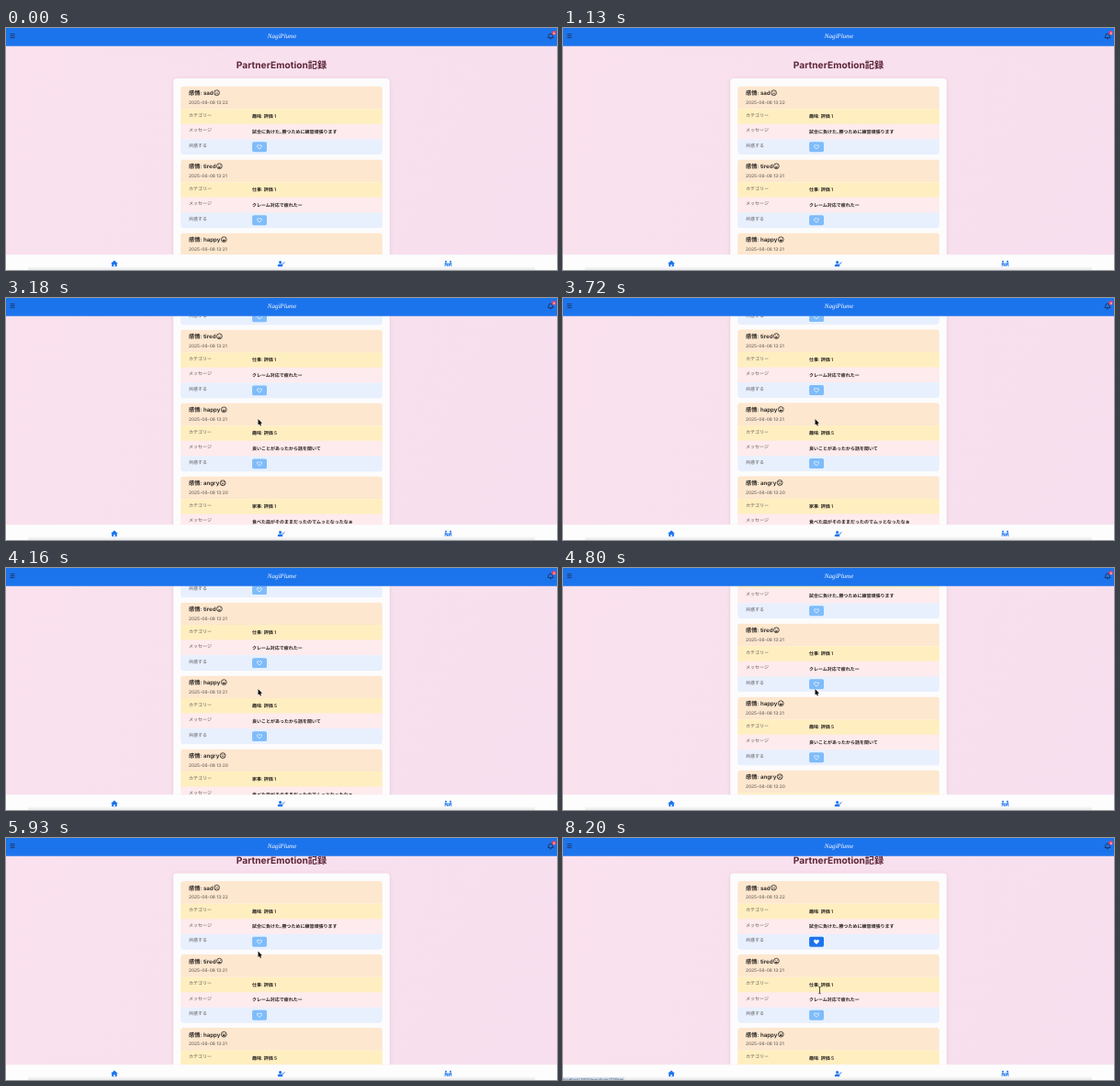
Write an HTML page with a canvas that moves like this. It is 600 px wide and 264 px high and loops after 8.22 s.

```html
<!DOCTYPE html>
<html lang="ja">
<head>
<meta charset="utf-8">
<title>PartnerEmotion記録</title>
<style>
html, body { margin: 0; width: 100%; height: 100%; overflow: hidden; background: #f9e0ee; }
canvas { display: block; width: 600px; height: 264px; }
</style>
</head>
<body>
<canvas id="stage"></canvas>
<script>
const W = 600, H = 264, LOOP = 8220;
const BLUE = '#1c74ed', INK = '#26211f', NAVY = '#22325c';
const SANS = 'Inter, "Noto Sans CJK JP", "Noto Sans CJK", sans-serif';
const CARD_TOP = 63.5, CARD_STEP = 80, ROW_TOP = 24.7, ROW = 16.5;
const ROW_COLORS = ['#ffefc0', '#feebed', '#e8f0fe'];
const LABELS = ['カテゴリー', 'メッセージ', '共感する'];

const canvas = document.getElementById('stage');
const g = canvas.getContext('2d');
const dpr = window.devicePixelRatio || 1;
canvas.width = W * dpr;
canvas.height = H * dpr;
g.textRendering = 'geometricPrecision';

const cards = [
  { mood: 'sad', time: '13:22', cat: '趣味: 評価 1', msg: '試合に負けた､勝つために練習頑張ります' },
  { mood: 'tired', time: '13:21', cat: '仕事: 評価 1', msg: 'クレーム対応で疲れたー' },
  { mood: 'happy', time: '13:21', cat: '趣味: 評価 5', msg: '良いことがあったから話を聞いて' },
  { mood: 'angry', time: '13:20', cat: '家事: 評価 1', msg: '食べた皿がそのままだったのでムッとなったなぁ' }
];

const span = (t, a, b) => Math.min(1, Math.max(0, (t - a) / (b - a)));
const smooth = (t, a, b) => { const u = span(t, a, b); return u * u * (3 - 2 * u); };
const settle = (t, a, b) => 1 - (1 - span(t, a, b)) ** 3;

// One flick down, then two strokes back up.
const scrollAt = t =>
  109.2 * settle(t, 2450, 3300) - 26.2 * smooth(t, 4000, 4750) - 66.5 * smooth(t, 5050, 5880);

function cursorAt(t) {
  const enter = smooth(t, 1200, 1850), nudge = smooth(t, 2350, 2550);
  const near = smooth(t, 5100, 5880), over = smooth(t, 6550, 6750), leave = smooth(t, 7560, 8000);
  return {
    x: 322 - 49 * enter + 1.5 * nudge + 1.5 * over + 3.5 * leave,
    y: 268 - 133 * enter - 3 * nudge - 8.5 * near - 9.5 * over + 52 * leave
  };
}

function rect(x, y, w, h, color, r = 0) {
  g.fillStyle = color;
  g.beginPath();
  g.roundRect(x, y, w, h, r);
  g.fill();
}

function dot(x, y, r, color) {
  g.fillStyle = color;
  g.beginPath();
  g.arc(x, y, r, 0, Math.PI * 2);
  g.fill();
}

function text(str, x, y, size, color, weight = 400, align = 'left') {
  g.font = `${weight} ${size}px ${SANS}`;
  g.fillStyle = color;
  g.textAlign = align;
  g.fillText(str, x, y);
  return g.measureText(str).width;
}

function line(color, width, ...points) {
  g.strokeStyle = color;
  g.lineWidth = width;
  g.beginPath();
  points.forEach(([x, y]) => g.lineTo(x, y));
  g.stroke();
}

function poly(color, ...points) {
  g.fillStyle = color;
  g.beginPath();
  points.forEach(([x, y]) => g.lineTo(x, y));
  g.fill();
}

function clipped(x, y, w, h, r, paint) {
  g.save();
  g.beginPath();
  g.roundRect(x, y, w, h, r);
  g.clip();
  paint();
  g.restore();
}

function heart(x, y, full) {
  g.beginPath();
  g.moveTo(x, y + 2.2);
  g.bezierCurveTo(x - 4.6, y - 0.9, x - 2, y - 3.6, x, y - 1.2);
  g.bezierCurveTo(x + 2, y - 3.6, x + 4.6, y - 0.9, x, y + 2.2);
  g.closePath();
  g.fillStyle = g.strokeStyle = '#fff';
  g.lineWidth = 0.7;
  if (full) g.fill();
  g.stroke();
}

function face(x, y, mood) {
  g.strokeStyle = INK;
  g.lineWidth = 0.8;
  g.beginPath();
  g.arc(x, y, 2.9, 0, Math.PI * 2);
  g.stroke();
  for (const s of [-1, 1]) {
    dot(x + s * 1.1, y - 0.7, 0.45, INK);
    if (mood === 'angry') line(INK, 0.5, [x + s * 1.8, y - 1.5], [x + s * 0.5, y - 0.9]);
  }
  g.beginPath();
  if (mood === 'happy') g.arc(x, y + 0.4, 1.6, 0, Math.PI);
  else g.arc(x, y + 2, 1.4, Math.PI, 0);
  if (mood === 'happy' || mood === 'tired') {
    g.fill();
  } else {
    g.lineWidth = 0.6;
    g.stroke();
  }
}

function card(c, y, liked) {
  clipped(190.2, y, 219.6, 74.8, 3.5, () => {
    rect(190, y, 220, ROW_TOP, '#fde7cf');
    ROW_COLORS.forEach((color, i) => rect(190, y + ROW_TOP + i * ROW, 220, ROW + 1, color));
  });
  const w = text('感情: ' + c.mood, 199, y + 9.8, 6.2, INK, 600);
  face(199 + w + 3.8, y + 7.2, c.mood);
  text('2025-06-08 ' + c.time, 199, y + 19.4, 4.85, '#6b625c', 500);
  LABELS.forEach((label, i) => text(label, 199, y + 33.4 + i * ROW, 5, '#5a5655'));
  text(c.cat, 268, y + 34.8, 5, INK, 600);
  text(c.msg, 268, y + 34.8 + ROW, 5, INK, 600);
  rect(268.1, y + 60.8, 15.9, 10.9, liked ? BLUE : '#7fbcfa', 1.6);
  heart(276, y + 66.3, liked);
}

function page(scroll, liked) {
  clipped(0, 19.5, W, 228, 0, () => {
    g.translate(0, -scroll);
    text('PartnerEmotion記録', 300, 44.2, 10.2, '#5e2638', 700, 'center');
    g.shadowColor = 'rgba(110,60,90,.16)';
    g.shadowBlur = 4 * dpr;
    g.shadowOffsetY = dpr;
    rect(182.2, 55, 235.6, 420, '#fdfcfc', 3.5);
    g.shadowColor = 'transparent';
    cards.forEach((c, i) => card(c, CARD_TOP + i * CARD_STEP, liked && i === 0));
  });
}

function bell(x, y) {
  g.strokeStyle = NAVY;
  g.lineWidth = 0.9;
  g.beginPath();
  g.arc(x, y - 0.8, 2, Math.PI, 0);
  g.lineTo(x + 3, y + 1.7);
  g.lineTo(x - 3, y + 1.7);
  g.closePath();
  g.stroke();
  dot(x, y + 2.7, 0.8, NAVY);
}

function header() {
  rect(0, 0, W, 19.7, BLUE);
  for (let i = 0; i < 3; i++) rect(4.5, 6.2 + i * 2, 5, 0.9, NAVY);
  g.font = 'italic 7px "Liberation Serif", serif';
  g.fillStyle = '#fff';
  g.textAlign = 'center';
  g.fillText('NagiPlume', 300.5, 10.7);
  bell(593, 8.9);
  dot(596.6, 5.4, 2.4, '#e5405a');
  text('4', 596.6, 6.7, 3.5, '#fff', 600, 'center');
}

function home(x, y) {
  poly(BLUE, [x - 3.8, y], [x, y - 3.4], [x + 3.8, y]);
  rect(x - 2.8, y - 0.2, 5.6, 3.4, BLUE, 0.4);
  rect(x - 0.8, y + 1.2, 1.6, 2, '#fdfdfe');
}

function person(x, y) {
  dot(x, y - 1.7, 1.5, BLUE);
  rect(x - 2.8, y + 0.3, 5.6, 2.8, BLUE, [2, 2, 0.4, 0.4]);
  line(BLUE, 0.9, [x + 1.8, y - 0.4], [x + 2.8, y + 0.7], [x + 4.8, y - 1.8]);
}

function table(x, y) {
  for (const s of [-1, 1]) {
    dot(x + s * 2.5, y - 2.2, 1, BLUE);
    line(BLUE, 1.1, [x + s * 2.5, y - 1.1], [x + s * 2.5, y + 1], [x + s * 0.9, y + 1], [x + s * 0.9, y + 3]);
    line(BLUE, 0.8, [x + s * 3.3, y - 1], [x + s * 3.3, y + 3.2]);
  }
  line(BLUE, 0.8, [x - 1.7, y], [x + 1.7, y]);
}

function navBar() {
  rect(0, 247.3, W, 17, '#fdfdfe');
  const shade = g.createLinearGradient(0, 260, 0, H);
  shade.addColorStop(0, 'rgba(190,190,195,0)');
  shade.addColorStop(1, 'rgba(190,190,195,.35)');
  rect(24, 260, 552, 4, shade);
  home(118, 257);
  person(298.6, 257.1);
  table(481.5, 257);
}

function statusBar() {
  clipped(0, 260.8, 67, 3.2, 0, () => {
    rect(0, 260.8, 67, 4, '#d5e0ee');
    text('localhost:3000/emotions/77/likes', 0, 264.7, 4.2, '#44505f');
  });
}

function arrow(x, y) {
  line('#fff', 1, [x, y], [x, y + 6.4], [x + 4.4, y + 4.7], [x, y]);
  poly('#111', [x, y], [x, y + 6.2], [x + 4.3, y + 4.6]);
  line('#111', 1.2, [x + 1.6, y + 4], [x + 2.9, y + 7.2]);
}

function hand(x, y) {
  for (const [grow, color] of [[0.4, '#111'], [0, '#fff']]) {
    rect(x - 0.7 - grow, y - grow, 1.4 + 2 * grow, 5 + 2 * grow, color, 0.8);
    rect(x - 1.8 - grow, y + 2.8 - grow, 4.6 + 2 * grow, 4 + 2 * grow, color, 1.2);
  }
}

function beam(x, y) {
  line('#222', 0.8, [x, y - 3.4], [x, y + 3.4]);
  for (const s of [-1, 1]) line('#222', 0.7, [x - 1.3, y + s * 3.8], [x, y + s * 3.3], [x + 1.3, y + s * 3.8]);
}

function draw(t) {
  g.setTransform(dpr, 0, 0, dpr, 0, 0);
  const bg = g.createLinearGradient(0, 0, W, H);
  bg.addColorStop(0, '#fae1ed');
  bg.addColorStop(1, '#f7dfef');
  rect(0, 0, W, H, bg);

  page(scrollAt(t), t >= 7200);
  header();
  navBar();
  if (t >= 6720) statusBar();

  const { x, y } = cursorAt(t);
  const pointer = t > 7750 ? beam : t > 6650 && y < 120 ? hand : arrow;
  pointer(x, y);
}

function frame() {
  draw(performance.now() % LOOP);
  requestAnimationFrame(frame);
}
frame();
</script>
</body>
</html>
```
